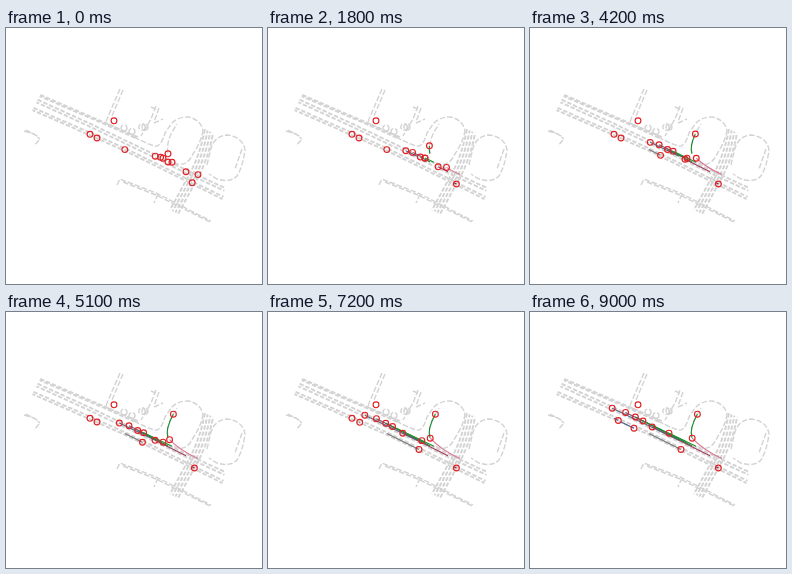
An HTML page that plays this animation: 256x256 px, repeating every 9.1 s.

```html
<!DOCTYPE html>
<html lang="en">
<head>
<meta charset="utf-8">
<title>Junction traffic</title>
<style>
  html, body { margin: 0; width: 100%; height: 100%; overflow: hidden; background: #fff; }
  svg { display: block; width: 100vw; height: 100vh; fill: none; }
  #map { stroke: #d3d3d3; stroke-width: 1.4; stroke-dasharray: 5.5 2; }
  #roads { stroke: #d3d3d3; stroke-width: 1.9; stroke-dasharray: 4.4 1.9; }
  #trails { stroke-width: 1.1; }
  #cars { stroke: #e02226; stroke-width: 1.15; }
</style>
</head>
<body>
<svg viewBox="0 0 256 256">
  <g id="roads"></g>
  <g id="map">
    <!-- slip roads -->
    <path d="M128 109Q147 119 151 118Q156 116 159 105L165 96Q171 89 182 89Q194 91 197 102"/>
    <path d="M162 125Q160 116 166 104L171 96"/>
    <path d="M197 102Q196 111 190 121L184 131Q177 140 167 134"/>
    <path d="M201 137L205 120Q209 108 221 107Q237 109 239 122Q237 138 231 148Q224 155 211 151L203 146"/>
    <path d="M236 121L229 141"/>
    <!-- side streets -->
    <path d="M114 61L101 91Q99 95 104 97L132 109"/>
    <path d="M117 62L106 88"/>
    <path d="M150 78L145 91L135 108M153 80L148 94M148 95L157 91M145 79L152 82"/>
    <path d="M111 157L114 151L150 165L205 193M117 154L150 167L204 194M152 166L148 175"/>
    <path d="M18 103L28 106L34 111M20 102L33 109M33 112L28 118"/>
    <circle cx="118" cy="100" r="3"/>
    <circle cx="126" cy="103.5" r="3"/>
    <circle cx="136" cy="99" r="3.2"/>
    <circle cx="139" cy="99" r="3"/>
  </g>
  <g id="trails"></g>
  <g id="cars"></g>
</svg>
<script>
const LOOP = 9100, STEP = 100;
const NS = "http://www.w3.org/2000/svg";

function add(parent, tag, attrs) {
  const node = document.createElementNS(NS, tag);
  for (const name in attrs) node.setAttribute(name, attrs[name]);
  return document.getElementById(parent).appendChild(node);
}

// A road is a bundle of evenly spaced dashed strands.
function addRoad(d, strands, gap, angle) {
  for (let i = 0; i < strands; i++) {
    const shift = (i - (strands - 1) / 2) * gap;
    add("roads", "path", {
      d,
      transform: `translate(${shift * Math.cos(angle)} ${shift * Math.sin(angle)})`,
      "stroke-dashoffset": i * 1.4
    });
  }
}

const MAIN = 2.01, CROSS = 0.43;
addRoad("M34 67.5L99 95.5L131 110", 2, 1.4, MAIN);
addRoad("M31 73L82 96.2L149 128.2L180 143.5L219 161.5", 2, 2.8, MAIN);
addRoad("M27 81L84 106L119 121.6L151 137.2L217 170", 2, 2.4, MAIN);
addRoad("M203 103Q198 130 186 151L168 184", 4, 3, CROSS);

// Easing curves: power above 1 speeds up, brake slows to a stop.
const power = p => u => u ** p;
const queue = power(1.1), launch = power(1.7);
const brake = u => 1 - (1 - u) ** 1.53;

function car(color, route, start = 0, end = 9, ease = queue) {
  return {
    start, end, ease,
    trail: add("trails", "path", { d: route, stroke: color, pathLength: 1 }),
    ring: add("cars", "circle", { r: 2.9 })
  };
}

const cars = [
  car("#777", "M108 92.8h.01"),
  car("#4b5a8c", "M84 106.3L88.3 108.5", 8, 9, launch),
  car("#4b5a8c", "M91 110L104 116.2", 6.8, 9, launch),
  car("#777", "M118.8 121.6L151 137.4", 2.2, 7.2),
  car("#d9768f", "M192 146.6Q173 138 162.2 126.2", 0, 6, brake),
  car("#a33a5c", "M180 143.7L122.2 115"),
  car("#56627f", "M149.2 128.2L82.2 96.2"),
  car("#7a5a70", "M154.6 129.3L95.6 100.4"),
  car("#3e6b4c", "M162 134L105.4 105"),
  car("#179a2b", "M166 134.2L113 109"),
  car("#179a2b", "M157 130.2L139 121.2", 6.2, 9, launch),
  car("#178a2b", "M162 125.8Q159 117 167.4 102.2", 0, 5),
  car("#9c1830", "M186.2 154.8L188.4 156", 0, 1.4)
];

function draw(ms) {
  const time = Math.floor(ms / STEP) * STEP / 1000;
  for (const { start, end, ease, trail, ring } of cars) {
    const part = ease(Math.min(1, Math.max(0, (time - start) / (end - start))));
    const { x, y } = trail.getPointAtLength(part * trail.getTotalLength());
    trail.setAttribute("stroke-dasharray", `${part} 2`);
    trail.setAttribute("visibility", part > 0 ? "visible" : "hidden");
    ring.setAttribute("cx", x);
    ring.setAttribute("cy", y);
  }
}

const begin = performance.now();
function tick() {
  draw((performance.now() - begin) % LOOP);
  requestAnimationFrame(tick);
}
tick();
</script>
</body>
</html>
```
